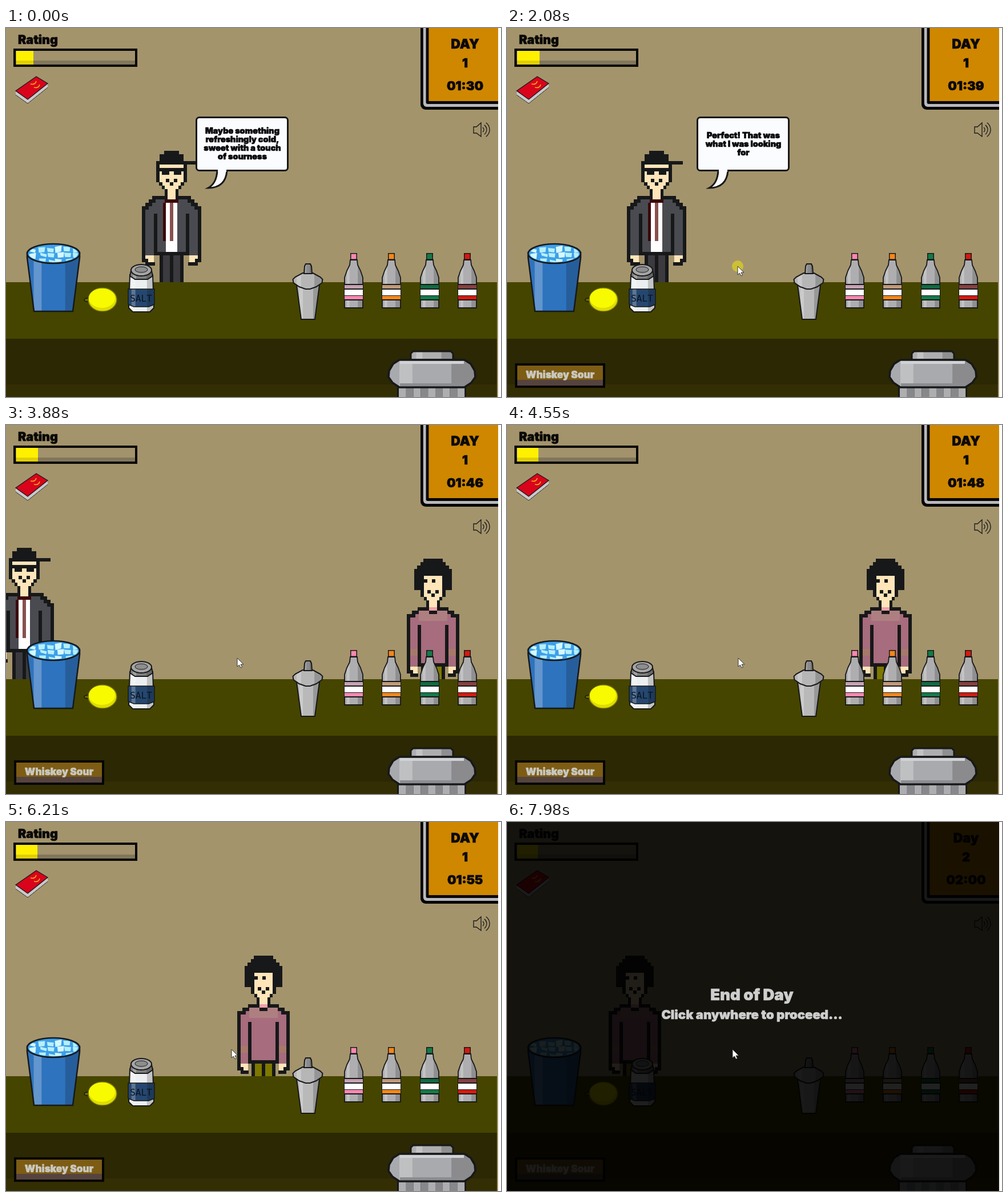
These frames come from a looping animation (867x646 px, 8000 ms). An HTML page with a canvas:

```html
<!DOCTYPE html>
<html lang="en">
<head>
<meta charset="utf-8">
<title>Bar shift</title>
<style>
html, body { margin: 0; width: 100%; height: 100%; overflow: hidden; background: #fff; }
canvas { display: block; }
</style>
</head>
<body>
<canvas id="stage" width="867" height="646"></canvas>
<script>
const ctx = document.getElementById('stage').getContext('2d');
const LOOP = 8000, SERVED = 1820, BUBBLE_END = 2500, DAY_END = 7480;
const WALK = 0.1278, CELL = 6.1, WIDTH = 862, HEIGHT = 646;
const INK = '#171819', SKIN = '#ffe5b9', METAL = '#aeaeb0';

const clamp = v => Math.max(0, Math.min(1, v));
const smooth = v => v * v * (3 - 2 * v);

function seeded(seed) {
  return () => (seed = seed * 16807 % 2147483647) / 2147483647;
}

function box(color, x, y, w, h) {
  ctx.fillStyle = color;
  ctx.fillRect(x, y, w, h);
}

function paint(fill, line = 0, ink = INK) {
  if (fill) { ctx.fillStyle = fill; ctx.fill(); }
  if (line) { ctx.strokeStyle = ink; ctx.lineWidth = line; ctx.stroke(); }
}

function poly(points, fill, line, ink) {
  ctx.beginPath();
  points.forEach(p => ctx.lineTo(...p));
  ctx.closePath();
  paint(fill, line, ink);
}

function oval(x, y, rx, ry, fill, line, ink) {
  ctx.beginPath();
  ctx.ellipse(x, y, rx, ry, 0, 0, 7);
  paint(fill, line, ink);
}

function rounded(x, y, w, h, r, fill, line) {
  ctx.beginPath();
  ctx.roundRect(x, y, w, h, r);
  paint(fill, line);
}

function text(str, x, y, size, color = '#0b0a08') {
  ctx.font = `900 ${size}px Inter, sans-serif`;
  ctx.textAlign = 'center';
  ctx.fillStyle = ctx.strokeStyle = color;
  ctx.lineWidth = 0.7;
  ctx.lineJoin = 'round';
  ctx.fillText(str, x, y);
  ctx.strokeText(str, x, y);
  ctx.lineJoin = 'miter';
}

// A symmetric body from [y, half width] pairs, lit from the left.
function vessel(cx, profile, fill, line = 2) {
  const side = s => profile.map(([y, half]) => [cx + s * half, y]);
  const outline = [...side(1), ...side(-1).reverse()];
  const widest = Math.max(...profile.map(p => p[1]));
  poly(outline, fill);
  ctx.save();
  ctx.clip();
  box('rgba(255,255,255,.25)', cx - widest * 0.75, 0, widest * 0.3, HEIGHT);
  box('rgba(0,0,0,.18)', cx + widest * 0.45, 0, widest, HEIGHT);
  ctx.restore();
  poly(outline, null, line);
}

// Blocky people on a grid whose origin is the middle of the shoulder line.
function person(cx, y, draw) {
  const ox = Math.round(cx), snap = v => Math.round(v * CELL);
  const cell = (color, col, row, cols = 1, rows = 1) =>
    box(color, ox + snap(col), y + snap(row), snap(col + cols) - snap(col), snap(row + rows) - snap(row));
  const band = (color, row, half, rows = 1) => cell(color, -half, row, half * 2, rows);
  const pair = (color, col, row, cols = 1, rows = 1) => {
    cell(color, col, row, cols, rows);
    cell(color, -col - cols, row, cols, rows);
  };
  draw({ cell, band, pair });
}

function body({ band, pair }, half, slope, arm, coat, pants) {
  band(pants, 17, 3.5, 9);
  pair(INK, 2.5, 17, 1, 9);
  band(INK, 17, 0.5, 9);
  const inset = i => 3 * Math.max(0, 1 - i / slope);
  for (let i = 0; i < 17; i++) band(INK, i, half - inset(i));
  for (let i = 1; i < 16; i++) band(coat, i, half - 0.9 - inset(i - 1));
  pair(INK, half - arm - 1, 5, 1, 12);
  pair(coat, half - arm, 16, arm - 1);
  pair(INK, half - arm, 17, arm, 2);
  pair(INK, half - arm - 0.3, 19, arm - 0.6);
  pair(SKIN, half - arm, 17, arm - 1, 2);
  pair(INK, half - 1.8, 18, 0.8);
  band(INK, 16, half - arm);
}

function face({ band, pair }, half, top, jaw) {
  band(INK, top, half + 1, jaw - top);
  band(SKIN, top, half, jaw - top);
  for (let row = jaw; row < 1; row++) {
    half = Math.max(1.1, half - 0.8);
    if (row < 0) band(INK, row, half + 0.9);
    band(SKIN, row, half);
  }
  pair(INK, 0.6, -5);
  band(INK, -4, 0.55);
}

function man(cx) {
  person(cx, 294, g => {
    body(g, 8.5, 3, 3.4, '#4a4b50', '#3b3b3f');
    g.band('#fff', 2, 1.6, 14);
    g.cell('#3b080b', -2.4, 2, 0.8, 11);
    g.band('#88504f', 2, 0.55, 11);
    face(g, 3.5, -9, -4);
    g.band('#3b080b', 1, 2);
    g.band(INK, -13, 2.2);
    g.band(INK, -12, 3.4, 2);
    g.cell(INK, -4.5, -10, 12);
    g.band(INK, -8, 4);
    g.pair(INK, 0.6, -7, 2.2);
  });
}

function woman(cx) {
  person(cx, 319, g => {
    body(g, 7.5, 2, 3, '#a76c7d', '#7d7800');
    g.band('#ae7f80', 1, 4.1, 3);
    g.pair('#a7796b', 4.5, 12, 2, 2);
    for (let i = 0; i < 4; i++) g.band(INK, i - 14, 2.8 + i * 0.87);
    g.band(INK, -11, 5.4, 6);
    face(g, 2.6, -9, -3);
    g.band('#f0a1aa', 0, 1.1);
    g.band(INK, 1, 1.1);
    g.cell(INK, -2.6, -8);
    g.cell(INK, -0.4, -8);
  });
}

function counter() {
  box('#454500', 0, 445, 860, 99);
  box('#2b2803', 0, 544, 860, 80);
  box('#342e04', 0, 624, 860, 22);
}

function bucket() {
  vessel(83, [[393, 46], [402, 46], [496, 34]], '#2e73bd', 2.5);
  oval(83, 395, 46, 17, '#3d9fe9', 2.5);
  ctx.save();
  oval(83, 395, 43, 15);
  ctx.clip();
  const rnd = seeded(29);
  for (let i = 0; i < 18; i++) {
    const x = 46 + i % 6 * 15 + rnd() * 5, y = 387 + Math.floor(i / 6) * 10 + rnd() * 3, tilt = rnd() * 6 - 3;
    poly([[x - 6, y - 4], [x + 6, y - 4 + tilt], [x + 5, y + 4], [x - 5, y + 4 - tilt]], i % 3 ? '#b6effa' : '#d4f8fc');
  }
  ctx.restore();
}

function lemon() {
  oval(143, 476, 6, 3, '#6a6700', 1.5);
  oval(169, 475.5, 25, 20.5, '#dfdc00', 1.5, '#77780a');
  oval(168, 473, 23, 17, '#f8fa00');
}

function salt() {
  vessel(237, [[432, 20], [490, 22], [497, 15]], '#eceff0');
  vessel(237, [[425, 18], [434, 20], [440, 11]], '#808080');
  oval(237, 424, 18, 10, '#a5a5a5', 2);
  oval(237, 423, 11, 5, '#8d8d8d', 1);
  vessel(237, [[457, 23], [484, 23], [488, 13]], '#25476f', 1.5);
  ctx.font = '16px "DejaVu Sans Mono", monospace';
  ctx.textAlign = 'center';
  ctx.fillStyle = '#0c1420';
  ctx.fillText('SALT', 236.5, 479);
}

function shaker() {
  vessel(529, [[450, 20], [510, 12]], '#b9b9ba');
  vessel(528.5, [[429, 9], [436, 22], [440, 26], [446, 25], [453, 15], [457, 4]], '#b6b6b7');
  vessel(529, [[413, 4], [417, 6], [430, 7]], '#8b8b8c');
}

function bottle(x, color, pale) {
  vessel(x, [[406, 6], [415, 7], [425, 12], [437, 16], [490, 16]], METAL, 1.8);
  box(INK, x - 17, 448, 34, 29);
  box(pale, x - 16, 450, 32, 6);
  box('#fff', x - 16, 458, 32, 10);
  box(color, x - 16, 469, 32, 6);
  box(INK, x - 6, 394, 12, 13);
  box(color, x - 4.5, 395.5, 9, 9);
}

function trash() {
  box(INK, 685, 626, 121, 20);
  for (let i = 0; i < 9; i++) box(i % 2 ? '#87888b' : METAL, 688 + i * 12.8, 626, 12.8, 20);
  vessel(746, [[566, 33], [570, 37], [581, 37]], METAL, 3);
  vessel(746, [[581, 57], [588, 68], [600, 75], [611, 76], [621, 69], [629, 57]], '#a9aaad', 3.5);
  box('#d1d2d5', 690, 583, 112, 5);
  box('#8c8d91', 690, 622, 112, 5);
}

function panel(sec, late) {
  ['#070604', '#b8b8bd', '#070604', '#cf8700'].forEach((color, i) =>
    rounded(726 + i * 4.8, -20, 200, 163 - i * 5, 9 - i * 3, color));
  text(late ? 'Day' : 'DAY', 804, 36, 23);
  text(late ? '2' : '1', 804, 69, 22);
  const two = n => String(n).padStart(2, '0');
  text(`${two(Math.floor(sec / 60))}:${two(sec % 60)}`, 804, 109, 22);
}

function speaker() {
  poly([[819, 173], [824, 173], [832, 166], [832, 190], [824, 184], [819, 184]], null, 1.3);
  for (let r = 5; r < 16; r += 5) {
    ctx.beginPath();
    ctx.arc(832, 178, r, -0.95, 0.95);
    paint(null, 1.3);
  }
}

function book() {
  const cover = [[17, 110], [53, 85], [73, 97], [38, 125]];
  for (let lift = 7; lift > 0; lift--) poly(cover.map(([x, y]) => [x, y + lift]), '#c9c9ca', 1, lift > 6 ? INK : '#c9c9ca');
  poly(cover, '#d9041b', 1.3);
  for (const y of [98, 104]) {
    ctx.beginPath();
    ctx.moveTo(y - 55, y);
    ctx.quadraticCurveTo(y - 47, y + 2, y - 45, y - 5);
    paint(null, 1.5, '#f4b61d');
  }
}

function framed(x, y, w, h, fill, shade, strip) {
  box('#050504', x, y, w, h);
  box(fill, x + 4, y + 4, w - 8, h - 8);
  box(shade, x + 4, y + h - 4 - strip, w - 8, strip);
}

function rating(length) {
  text('Rating', 56, 28, 21.5);
  framed(13, 36, 217, 32, '#a2936d', '#81765a', 7);
  box('#fff000', 18, 40, length, 17);
  box('#e0cf05', 18, 57, length, 7);
}

function bubble(lines) {
  rounded(333.5, 156.5, 160, 93, 5, '#fafcff', 3);
  ctx.beginPath();
  ctx.moveTo(370, 249);
  ctx.quadraticCurveTo(369, 272, 354, 280);
  ctx.quadraticCurveTo(385, 280, 387, 249);
  paint('#fafcff', 3);
  box('#fafcff', 371, 246, 15, 6);
  lines.forEach((line, i) => text(line, 414, 215 - lines.length * 7.5 + i * 15, 14.4, '#08080a'));
}

function label(alpha) {
  ctx.globalAlpha = alpha;
  framed(14, 587, 158, 43, '#7d5c14', '#55433e', 10);
  text('Whiskey Sour', 93, 613, 17.2, '#c9c8bf');
  ctx.globalAlpha = 1;
}

function cursor([x, y], pressed) {
  if (pressed) oval(x, y, 10, 10, '#cdbf36');
  const arrow = [[0, 0], [0, 15], [3.5, 12], [6, 17], [8.5, 16], [6, 11], [11, 11]];
  poly(arrow.map(([a, b]) => [x + a, y + b]), '#fff', 1, '#333');
}

// Moves are { at, time, to }: start, duration and end point.
function pointer(t) {
  const moves = [
    { at: 70, time: 790, to: [530, 470] },
    { at: 1070, time: 480, to: [404, 417] },
    { at: 2200, time: 250, to: [405, 408] },
    { at: 5090, time: 160, to: [395, 398] },
  ];
  return moves.reduce((from, { at, time, to }) => {
    const k = smooth(clamp((t - at) / time));
    return from.map((v, i) => v + (to[i] - v) * k);
  }, [700, 620]);
}

const BOTTLES = [['#f888b0', '#c5a2b2'], ['#f3871b', '#c09a78'], ['#147a48', '#106b40'], ['#d41a10', '#87403f']];

// The rating drains one pixel about every two seconds after the serving.
function ratingLength(t) {
  return t < SERVED ? 30 : 39 - Math.floor((t - 500) / 2000);
}

function draw(t) {
  const late = t >= DAY_END;
  ctx.save();
  ctx.beginPath();
  ctx.rect(0, 0, WIDTH, HEIGHT);
  ctx.clip();
  box('#a4946c', 0, 0, WIDTH, HEIGHT);
  man(289.5 - WALK * Math.max(0, t - 1866));
  woman(748.5 - WALK * (t - 3880));
  counter();
  bucket();
  lemon();
  salt();
  shaker();
  BOTTLES.forEach((colors, i) => bottle(Math.round(609 + i * 66.3), ...colors));
  trash();
  panel(late ? 120 : Math.floor(90.9 + 0.0039 * t), late);
  speaker();
  book();
  rating(ratingLength(t));
  if (t < SERVED) bubble(['Maybe something', 'refreshingly cold,', 'sweet with a touch', 'of sourness']);
  else if (t < BUBBLE_END) bubble(['Perfect! That was', 'what I was looking', 'for']);
  label(clamp((t - 1000) / 500));
  if (late) {
    box('rgba(0,0,0,.87)', 0, 0, WIDTH, HEIGHT);
    text('End of Day', 429, 312, 27.5, '#cecece');
    text('Click anywhere to proceed...', 429, 345, 22, '#cecece');
  }
  if (t >= 70) cursor(pointer(t), t > 1750 && t < 2150);
  ctx.restore();
  box('#fff', WIDTH, 0, 5, HEIGHT);
}

function tick() {
  draw(performance.now() % LOOP);
  requestAnimationFrame(tick);
}
tick();
</script>
</body>
</html>
```
